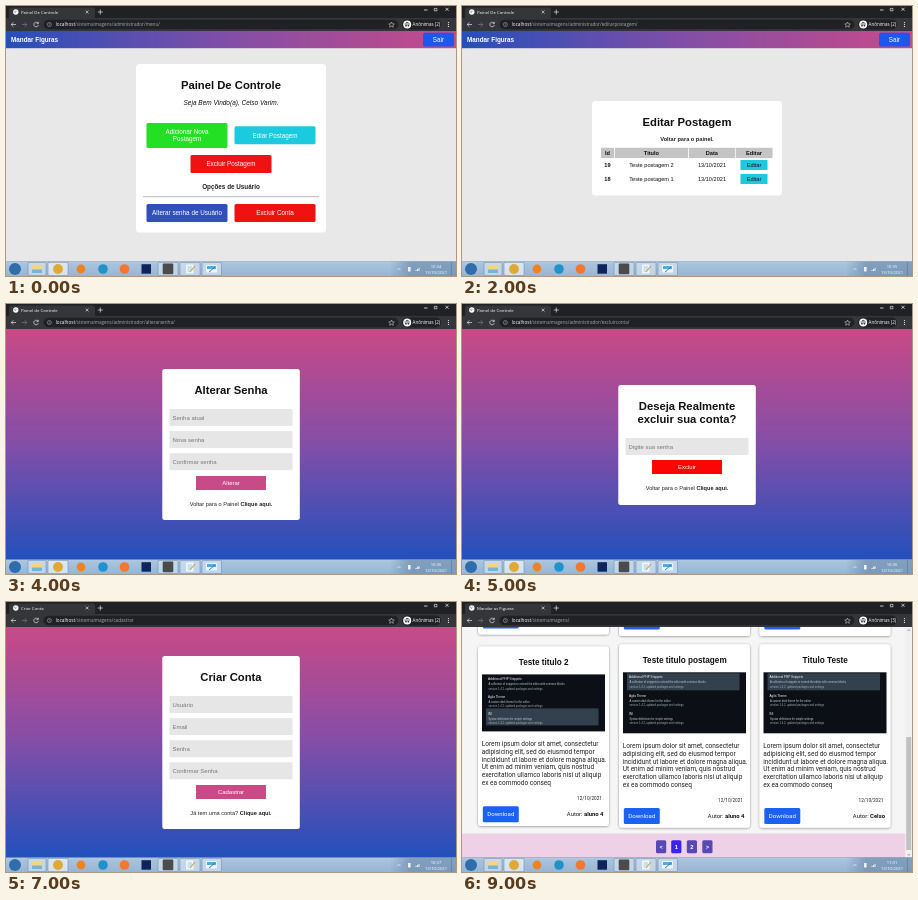
An HTML page that plays this animation: 450 px wide and 270 px high, repeating every 10 s.

```html
<!DOCTYPE html>
<html lang="pt">
<head>
<meta charset="utf-8">
<title>Painel</title>
<style>
html, body { margin: 0; width: 100%; height: 100%; overflow: hidden; background: #e8e8e8; }
svg { display: block; width: 100vw; height: 100vh; }
text { font-family: "Liberation Sans", Arial, sans-serif; white-space: pre; }
.ui { font-family: "Open Sans", sans-serif; }
.body { font-family: Roboto, sans-serif; }
.mono { font-family: "Liberation Mono", monospace; }
</style>
</head>
<body>
<svg id="stage" viewBox="0 0 450 270" preserveAspectRatio="none">
<defs>
  <linearGradient id="bar"><stop stop-color="#264fba"/><stop offset=".5" stop-color="#834ea7"/><stop offset="1" stop-color="#c84a87"/></linearGradient>
  <linearGradient id="wall" x2="0" y2="1"><stop stop-color="#c84a87"/><stop offset=".5" stop-color="#834ea7"/><stop offset="1" stop-color="#2250bc"/></linearGradient>
  <linearGradient id="task" x2="0" y2="1"><stop stop-color="#c3d6e8"/><stop offset=".15" stop-color="#a9c3dd"/><stop offset="1" stop-color="#97b5d4"/></linearGradient>
  <linearGradient id="tray"><stop stop-color="#6f8fb0" stop-opacity="0"/><stop offset=".3" stop-color="#6f8fb0" stop-opacity=".7"/><stop offset="1" stop-color="#6f8fb0" stop-opacity=".7"/></linearGradient>
  <filter id="shadow" x="-10%" y="-10%" width="120%" height="120%"><feDropShadow dx="0" dy=".5" stdDeviation="1.2" flood-opacity=".45"/></filter>
  <clipPath id="view"><rect y="25" width="450" height="231"/></clipPath>
</defs>
</svg>
<script>
const STEP = 1000;
const SITE = 'Mandar Figuras', SITE_TAB = 'Mandar as Figuras';
const OWNER = 'Celso Varim', MEMBER = 'aluno 4';
const PINK = '#c84a87', BLUE = '#3150b9', RED = '#f01212', FIELD = '#e6e6e6', HINT = '#777';

const rect = (x, y, w, h, fill, r = 0, extra = '') =>
  `<rect x="${x}" y="${y}" width="${w}" height="${h}" rx="${r}" fill="${fill}" ${extra}/>`;
const circle = (x, y, r, fill) => `<circle cx="${x}" cy="${y}" r="${r}" fill="${fill}"/>`;
const line = (d, color, width = .7) =>
  `<path d="${d}" fill="none" stroke="${color}" stroke-width="${width}"/>`;
const text = (s, x, y, size, { fill = '#111', at = 'start', bold, italic, cls = '' } = {}) =>
  `<text x="${x}" y="${y}" font-size="${size}" fill="${fill}" text-anchor="${at}" class="${cls}"` +
  `${bold ? ' font-weight="700"' : ''}${italic ? ' font-style="italic"' : ''}>${s}</text>`;
const mid = (s, x, y, size, opts = {}) => text(s, x, y, size, { at: 'middle', ...opts });
const bold = s => `<tspan font-weight="700">${s}</tspan>`;

function button(lines, x, y, w, h, fill, { size = 6.33, r = 1.5, color = '#fff', cls = '' } = {}) {
  const list = [].concat(lines), lead = 7.4;
  const first = y + h / 2 + size * .35 - (list.length - 1) * lead / 2;
  return rect(x, y, w, h, fill, r) +
    list.map((s, i) => mid(s, x + w / 2, first + i * lead, size, { fill: color, cls })).join('');
}
const field = (hint, x, y, w, h) =>
  rect(x, y, w, h, FIELD) + text(hint, x + 3, y + h / 2 + 2.1, 5.98, { fill: HINT });

// Browser frame and taskbar
function browser({ tab, path, windows = 2 }) {
  const ink = '#e4e6e9', soft = '#a3a8ae', ui = 'ui';
  return rect(0, 0, 450, 25, '#35363a') + rect(0, 0, 450, 12, '#202124') +
    rect(3, 1.5, 86, 13, '#35363a', 2.5) +
    circle(9.8, 6, 2.7, '#fff') + line('M8 5.2l1.6.6-.4 1.4M10 4.4l1.2 1.2', '#5f6368', .6) +
    text(tab, 15, 7.6, 4.3, { fill: '#fff', cls: ui }) +
    line('M79.7 4.6l2.8 2.8m0-2.8l-2.8 2.8', ink) + line('M91.8 6h5m-2.5-2.5v5', ink) +
    line('M418 4h3.6M439.5 1.8l3 3m0-3l-3 3', '#fff') +
    line('M428.3 2.4h2.6v2.4h-2.6z', '#fff', .6) +
    line('M10 18.5H5.2m2.2-2.2l-2.2 2.2 2.2 2.2', ink) +
    line('M16 18.5h4.8m-2.2-2.2l2.2 2.2-2.2 2.2', '#77797d') +
    line('M32 17.2a2.3 2.3 0 1 0 .3 2M32.3 15.8v1.8h-1.8', ink) +
    rect(37.5, 13.8, 355, 9.4, '#202124', 4.7) +
    `<circle cx="43.4" cy="18.5" r="2" fill="none" stroke="${soft}" stroke-width=".6"/>` +
    line('M43.4 18.2v1.2m0-2.2v.5', soft, .6) +
    text(`<tspan fill="#fff">localhost</tspan>/sistemaimagens/${path}`, 49.7, 20.2, 4.64, { fill: soft, cls: ui }) +
    line('M385.5 16l.8 1.8 2 .2-1.5 1.3.5 2-1.8-1.1-1.8 1.1.5-2-1.5-1.3 2-.2z', ink, .5) +
    rect(396, 13.5, 39, 10, '#202124', 5) + circle(401.2, 18.5, 4, '#fff') +
    line('M398.5 18h5.4M399.9 16.5h2.6', '#35363a', .8) +
    circle(400, 19.7, .9, '#35363a') + circle(402.4, 19.7, .9, '#35363a') +
    text(`Anônimas (${windows})`, 406.6, 20.2, 4.5, { fill: '#fff', cls: ui }) +
    [16.6, 18.5, 20.4].map(y => circle(442.5, y, .6, ink)).join('');
}

function taskbar({ clock, paint = true }) {
  const slot = (x, w, fill = '#d3e1ee') =>
    rect(x, 256.4, w, 13.2, fill, 1, 'fill-opacity=".7" stroke="#6884a1" stroke-width=".5"');
  const white = { fill: '#fff', cls: 'ui' };
  return rect(0, 255.5, 450, 14.5, 'url(#task)') + rect(384, 255.5, 66, 14.5, 'url(#tray)') +
    line('M0 255.7H450', '#6b839c', .5) + circle(9, 263, 6, '#2f6eaa') +
    slot(22, 18) + rect(26, 259, 10, 8, '#f2d67c', .8) + rect(26, 263.5, 10, 3.5, '#76b3dc', .6) +
    slot(42, 20, '#f0f5fa') + circle(52, 263, 4.9, '#e0a834') +
    circle(75, 263, 4.4, '#ee8320') + circle(97, 263, 4.8, '#2192c9') +
    circle(118.5, 263, 4.8, '#f27731') + rect(135.5, 258.2, 9.5, 9.5, '#10245c') +
    slot(152, 20) + rect(156.7, 257.6, 10.6, 10.6, '#4b4b4b', 1) +
    slot(174, 20) + rect(180, 258.5, 7.5, 9, '#eef7fc', .5) +
    line('M181.5 261h4.5m-4.5 2h4.5m-4.5 2h3', '#6fb0d5', .6) + line('M184 266l5-6', '#d39a3b', 1.1) +
    (paint ? slot(196, 19.5) + rect(200, 259, 11, 7.5, '#e8f5fd', .5) +
      rect(201, 260, 9, 3, '#58a9d9') + line('M203 266l6-5', '#3d7298', .9) : '') +
    line('M391.5 264l1.5-1.5 1.5 1.5', '#fff') + rect(402, 261, 2.6, 4.5, '#edf3f8') +
    line('M410 265v-1m1.5 1v-2m1.5 2v-3', '#fff', .9) +
    mid(clock, 430, 261.9, 4.2, white) + mid('13/10/2021', 430, 268.1, 4.2, white) +
    line('M445.5 256v14', '#56718d', .5);
}

const header = (w = 450) => rect(0, 25, w, 17.2, 'url(#bar)') +
  text(SITE, 5, 35.8, 6.33, { fill: '#fff', bold: true });

const adminPage = content => rect(0, 25, 450, 231, '#e8e8e8') + header() +
  button('Sair', 417, 26.8, 31, 13.8, '#1f57ee') + content;
const panel = (y, h) => rect(130, y, 190, h, '#fff', 3.5);
const title = (s, y) => mid(s, 225, y, 11.25, { bold: true });

const menu = () => adminPage(panel(58, 168.5) + title('Painel De Controle', 83) +
  mid(`Seja Bem Vindo(a), ${OWNER}.`, 225, 99.3, 6.5, { italic: true }) +
  button(['Adicionar Nova', 'Postagem'], 140.5, 117, 81, 25, '#24e024') +
  button('Ediar Postagem', 228.5, 120.3, 81, 18, '#1bcadf') +
  button('Excluir Postagem', 184.5, 149, 81, 18, RED) +
  mid('Opções de Usuário', 225, 182.5, 6.33, { bold: true, fill: '#222' }) +
  line('M137 190.7H313', '#999', .7) +
  button('Alterar senha de Usuário', 140.5, 198, 81, 18, BLUE) +
  button('Excluir Conta', 228.5, 198, 81, 18, RED));

const newPost = () => adminPage(panel(58, 168.5) + title('Adicionar Postagem', 83.3) +
  field('Titulo', 146, 93.3, 158, 17) + rect(146, 115.3, 158, 44, FIELD) +
  text('Descrição', 148.5, 122.3, 5.9, { fill: HINT, cls: 'mono' }) +
  rect(146, 164.5, 106, 10.5, FIELD) + text('Selecionar Imagem', 147.5, 171.6, 5.63, { fill: HINT }) +
  button('Selecionar Imagem', 251.3, 164.5, 52.7, 10.5, '#3a50b8', { size: 5.63, r: 0 }) +
  button('Publicar postagem', 190, 180.3, 70, 14, PINK, { size: 5.98, r: 0 }) +
  text('Voltar para o Painel.', 304, 208.5, 5.63, { at: 'end', bold: true, fill: '#222' }));

function postList(verb, action, color) {
  const columns = [['Id', 139, 13], ['Titulo', 152.8, 73.3], ['Data', 226.9, 46], [verb, 273.7, 36.8]];
  const heads = columns.map(([name, x, w]) => rect(x, 141.8, w, 10.3, '#c4c4c4') +
    mid(name, x + w / 2, 148.9, 5.63, { bold: true })).join('');
  const rows = [[19, 2], [18, 1]].map(([id, n], i) => {
    const y = 161 + i * 14;
    return mid(id, 145.5, y, 5.63, { bold: true }) + mid(`Teste postagem ${n}`, 189.5, y, 5.63) +
      mid('13/10/2021', 250, y, 5.63) +
      button(action, 278.5, y - 7, 27, 10, color, { size: 5.63, r: 0, color: '#2a0808' });
  }).join('');
  return adminPage(panel(95, 94.5) + title(`${verb} Postagem`, 119.8) +
    mid('Voltar para o painel.', 225, 134.8, 5.63, { bold: true, fill: '#222' }) + heads + rows);
}

function form({ heading, hints, action, color = PINK, note, link = 'Clique aqui.' }) {
  const lines = [].concat(heading), extra = (lines.length - 1) * 13;
  const h = 85 + 22 * hints.length + extra, top = Math.round(140.6 - h / 2);
  const first = top + 40 + extra, after = Math.round(first + 22.2 * hints.length);
  return rect(0, 25, 450, 231, 'url(#wall)') + rect(156.3, top, 137.5, h, '#fff', 2.5) +
    lines.map((s, i) => title(s, top + 25 + i * 13)).join('') +
    hints.map((s, i) => field(s, 163.5, first + i * 22.1, 123, 17)).join('') +
    button(action, 190, after, 70, 14, color, { size: 5.98, r: 0 }) +
    mid(`${note} ${bold(link)}`, 225, after + 30, 5.63, { fill: '#222' });
}

// Gallery
const LOREM = ['Lorem ipsum dolor sit amet, consectetur', 'adipisicing elit, sed do eiusmod tempor',
  'incididunt ut labore et dolore magna aliqua.', 'Ut enim ad minim veniam, quis nostrud',
  'exercitation ullamco laboris nisi ut aliquip', 'ex ea commodo conseq'];

function codeShot(x, y, h, band) {
  const notes = [['Additional PHP Snippets', 'A collection of snippets to extend the editor with common blocks'],
    ['Agila Theme', 'A custom dark theme for the editor'], ['INI', 'Syntax definitions for simple settings']];
  return rect(x, y, 123, h, '#0c1016') + rect(x + 4, y + band, 112.5, 17, '#33414e') +
    notes.map(([name, about], i) => {
      const ty = y + 6 + i * h * .3;
      return text(name, x + 6, ty, 3.1, { fill: '#f0f3f6' }) +
        text(about, x + 6.5, ty + 5, 2.7, { fill: '#c3ccd4' }) +
        text('version 1.4.2, updated packages and settings', x + 6.5, ty + 9.5, 2.7, { fill: '#a3afba' });
    }).join('');
}

function heroShot(x, y, h) {
  const cx = x + 62;
  const screens = [[-23, 8, 14, 10], [-21, 20, 11, 8], [1, 6, 19, 10], [10, 18, 11, 8]];
  return rect(x, y, 123, h, '#1b1b5c') +
    `<ellipse cx="${cx}" cy="${y + 56}" rx="18" ry="3" fill="#17407f"/>` +
    screens.map(([dx, dy, w, sh]) => rect(cx + dx, y + dy, w, sh, '#1f7f9d', .5) +
      line(`M${cx + dx + 2} ${y + dy + 3}h${w - 4}m0 3h${4 - w}`, '#43bcc9', .7)).join('') +
    rect(cx - 9, y + 21, 3, 6, '#a33a58', 1) + rect(cx + 6, y + 21, 3, 6, '#a33a58', 1) +
    circle(cx, y + 19, 3.6, '#35365f') +
    `<path d="M${cx - 6} ${y + 24}q6-3 12 0l4 12-2 2-4-6 1 23h-4l-1-15-1 15h-4l1-23-4 6-2-2z" fill="#29b5e2"/>` +
    rect(cx - 2, y + 24, 4, 11, '#1c4b88', 1);
}

function card({ x, y, h, shot, name, tail = '', date, author }) {
  const end = y + 28 + h, left = x + 4, cls = 'body';
  return rect(x, y, 131, h + 122.5, '#fff', 3, 'filter="url(#shadow)"') +
    mid(name, x + 65.7, y + 19, 8.2, { bold: true }) + shot(left, y + 28, h) +
    LOREM.map((s, i) => text(i === 5 ? s + tail : s, left - .3, end + 14.8 + i * 7.72, 6.5, { fill: '#222', cls })).join('') +
    text(date, x + 124, end + 68.4, 4.7, { at: 'end', fill: '#222', cls }) +
    button('Download', x + 4.8, end + 74.8, 36, 16, '#1b62f4', { size: 6.1, cls }) +
    text(`Autor: ${bold(author)}`, x + 125.5, end + 85, 5.9, { at: 'end', cls });
}

const scrollbar = (y, h) => rect(443.5, 25, 6.5, 231, '#f1f1f1') + rect(444.2, y, 5, h, '#c1c1c1') +
  line('M445.4 29l1.4-1.5 1.4 1.5M445.4 252l1.4 1.5 1.4-1.5', '#666', .6);
const stub = (x, y, h) => rect(x, y, 131, h, '#fff', 3, 'filter="url(#shadow)"');
const COLS = [16, 157, 297.5];
const shotAt = band => (x, y, h) => codeShot(x, y, h, band);

const galleryTop = () => rect(0, 25, 450, 231, '#f5f5f5') +
  card({ x: COLS[0], y: 54, h: 61, shot: shotAt(1), name: 'Teste postagem 2', tail: ' teste.', date: '13/10/2021', author: OWNER }) +
  card({ x: COLS[1], y: 52.3, h: 64, shot: heroShot, name: 'Teste postagem 1', date: '13/10/2021', author: OWNER }) +
  card({ x: COLS[2], y: 52.3, h: 64, shot: heroShot, name: 'Teste titulo', date: '12/10/2021', author: MEMBER }) +
  stub(COLS[0], 252, 30) + stub(COLS[1], 250, 30) + stub(COLS[2], 250, 30) +
  header(443.5) + rect(202, 27.8, 66, 12, '#cbc5cb', 1) +
  text('Pesquisar', 205, 35.6, 5, { fill: HINT }) +
  '<circle cx="274.3" cy="32.2" r="3.3" fill="none" stroke="#111" stroke-width="1.4"/>' +
  line('M276.6 34.6l3.9 4', '#111', 2) +
  button('Entrar', 414, 26.8, 26.5, 13.3, '#1f57ee') + scrollbar(31, 115);

function galleryEnd() {
  const pages = [['&lt;', 194], ['1', 209.2], ['2', 224.8], ['&gt;', 240.3]];
  return rect(0, 25, 450, 231, '#f5f5f5') +
    COLS.map((x, i) => stub(x, 10, i ? 24 : 22.5) + rect(x + 4.8, 14, 36, i ? 13.5 : 12.5, '#1b62f4', 1.5)).join('') +
    card({ x: COLS[0], y: 44.4, h: 57, shot: shotAt(34), name: 'Teste titulo 2', date: '12/10/2021', author: MEMBER }) +
    card({ x: COLS[1], y: 42.3, h: 61, shot: shotAt(1), name: 'Teste titulo postagem', date: '12/10/2021', author: MEMBER }) +
    card({ x: COLS[2], y: 42.3, h: 61, shot: shotAt(1), name: 'Titulo Teste', date: '12/10/2021', author: OWNER.split(' ')[0] }) +
    rect(0, 231.5, 443.5, 24.5, '#eed1e6') +
    pages.map(([s, x]) => button(bold(s), x, 238.3, 10.2, 13, s === '1' ? '#3a22ef' : '#5748b4', { size: 5.8 })).join('') +
    scrollbar(135, 113);
}

const ADMIN = 'administrador/', TAB = 'Painel De Controle';
const scenes = [
  { tab: TAB, path: ADMIN + 'menu/', clock: '10:34', page: menu() },
  { tab: TAB, path: ADMIN + 'novapostagem/', clock: '10:35', paint: false, page: newPost() },
  { tab: TAB, path: ADMIN + 'editarpostagem/', clock: '10:35', page: postList('Editar', 'Editar', '#1bcadf') },
  { tab: TAB, path: ADMIN + 'excluirpostagem/', clock: '10:36', page: postList('Excluir', 'Deletar', '#fb0505') },
  { tab: 'Painel de Controle', path: ADMIN + 'alterarsenha/', clock: '10:36', page: form({
    heading: 'Alterar Senha', hints: ['Senha atual', 'Nova senha', 'Confirmar senha'],
    action: 'Alterar', note: 'Voltar para o Painel' }) },
  { tab: 'Painel de Controle', path: ADMIN + 'excluirconta/', clock: '10:36', page: form({
    heading: ['Deseja Realmente', 'excluir sua conta?'], hints: ['Digite sua senha'],
    action: 'Excluir', color: '#fb0505', note: 'Voltar para o Painel' }) },
  { tab: 'Login', path: 'login', clock: '10:37', page: form({
    heading: 'Login', hints: ['Usuário', 'Senha'], action: 'Entrar', note: 'Não tem uma conta?' }) },
  { tab: 'Criar Conta', path: 'cadastrar', clock: '10:37', page: form({
    heading: 'Criar Conta', hints: ['Usuário', 'Email', 'Senha', 'Confirmar Senha'],
    action: 'Cadastrar', note: 'Já tem uma conta?' }) },
  { tab: SITE_TAB, path: '', clock: '11:01', windows: 3, page: galleryTop() },
  { tab: SITE_TAB, path: '', clock: '11:01', windows: 3, page: galleryEnd() }
];

const stage = document.getElementById('stage');
stage.insertAdjacentHTML('beforeend', scenes.map(s =>
  `<g class="scene" display="none"><g clip-path="url(#view)">${s.page}</g>${browser(s)}${taskbar(s)}</g>`).join(''));
const layers = stage.querySelectorAll('.scene');
let shown = -1;

function draw() {
  const now = Math.floor(performance.now() / STEP) % scenes.length;
  if (now !== shown) {
    layers.forEach((layer, i) => layer.setAttribute('display', i === now ? 'inline' : 'none'));
    shown = now;
  }
  requestAnimationFrame(draw);
}
draw();
</script>
</body>
</html>
```
